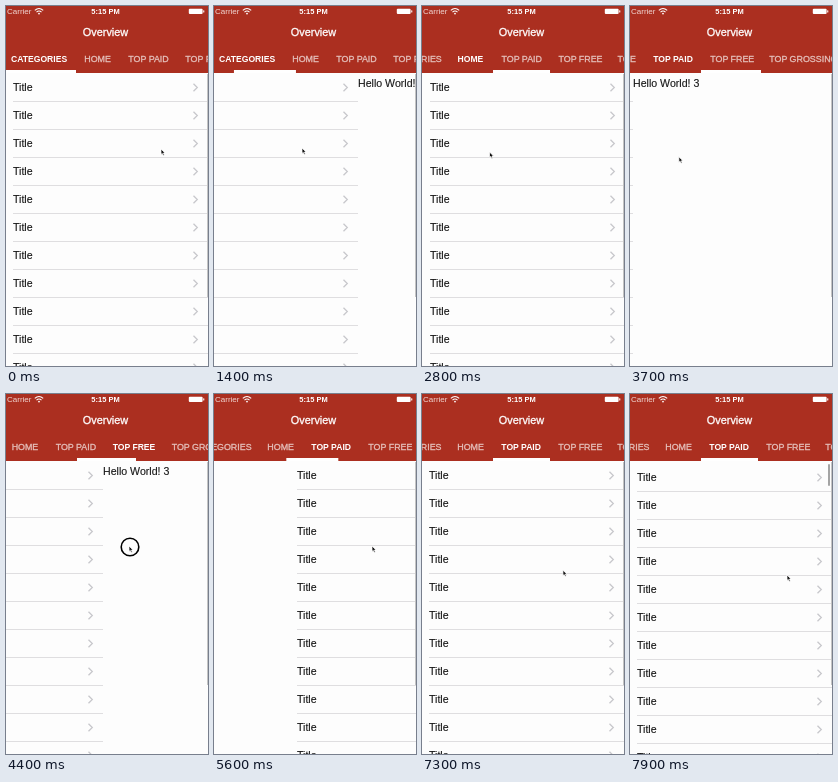
Recreate the animation shown at these times as an HTML page. Size 202 by 360 pixels, loop 8 s.

```html
<!DOCTYPE html>
<html lang="en">
<head>
<meta charset="utf-8">
<title>Overview</title>
<style>
  html, body { margin: 0; width: 100%; height: 100%; overflow: hidden; }
  body { font: 10.6px "Liberation Sans", Arial, sans-serif; color: #161616; background: #fdfdfd; }
  #stage { position: relative; width: 202px; height: 360px; overflow: hidden; background: #fdfdfd; }
  #stage div, #stage svg, #stage span { position: absolute; }
  .page { top: 0; width: 202px; height: 360px; -webkit-text-stroke: .12px; }
  .row { left: 7px; width: 195px; height: 27px; line-height: 27px; border-bottom: 1px solid #dfdee0; }
  .row svg { left: 179px; top: 8px; }
  .hello { top: 71px; line-height: 13px; white-space: pre; }
  #head { width: 202px; height: 67px; background: #ab2f20; color: #fff; overflow: hidden; }
  #title { top: 19px; width: 199px; text-align: center; font-size: 10.9px; line-height: 14px; -webkit-text-stroke: .3px; }
  #carrier { left: 1px; top: 0; font-size: 8px; line-height: 11px; color: #f1d8d4; }
  #clock { width: 199px; top: 0; text-align: center; font-size: 7.5px; line-height: 11px; font-weight: bold; }
  .tab { top: 47px; font-size: 8.9px; line-height: 13px; white-space: pre; color: #e5c1bc; -webkit-text-stroke: .3px; }
  .tab.on { color: #fff; font-weight: bold; font-size: 8.6px; -webkit-text-stroke: 0; }
  #bar { left: 0; top: 64px; height: 3px; background: #fff; }
  #edge { left: 201px; top: 68px; width: 1px; height: 223px; background: #c4c4c4; }
  #thumb { left: 198px; top: 70px; width: 2px; height: 22px; border-radius: 1px; background: #a4a4a4; }
  #cursor, #ring { left: 0; top: 0; overflow: visible; }
</style>
</head>
<body>
<div id="stage">
  <div id="strip"></div>
  <div id="thumb"></div>
  <div id="edge"></div>
  <div id="head">
    <div id="carrier">Carrier</div>
    <svg width="10" height="8" style="left:28px;top:1px" fill="none" stroke="#fff" stroke-width="1.1">
      <path d="M.8 3.4Q5 -.4 9.2 3.4M2.5 5.1Q5 2.9 7.5 5.1"/>
      <circle cx="5" cy="6.6" r=".9" fill="#fff" stroke="none"/>
    </svg>
    <div id="clock">5:15 PM</div>
    <svg width="18" height="8" style="left:182px;top:2px" fill="#fff">
      <rect x=".8" y=".8" width="13.8" height="5.2" rx="1"/>
      <rect x="15.2" y="2.3" width="1.1" height="2.2" rx=".5"/>
    </svg>
    <div id="title">Overview</div>
    <div id="tabs"></div>
    <div id="bar"></div>
  </div>
  <svg id="ring" width="20" height="20"><circle cx="1" cy="1" r="8.8" fill="none" stroke="#000" stroke-width="1.6"/></svg>
  <svg id="cursor" width="8" height="10"><path transform="scale(.85)" d="M0 0V6.4L1.5 5.2 2.6 7.6 3.9 7 2.9 4.7H4.8Z" fill="#111" stroke="#fff" stroke-width=".9"/></svg>
</div>
<script>
const LOOP = 8000, STEP = 100, W = 202;
const $ = id => document.getElementById(id);

const names = ["CATEGORIES", "HOME", "TOP PAID", "TOP FREE", "TOP GROSSING"];
const textX = [5, 78.3, 122.3, 179.3, 238.3];
const edges = [0, 69.5, 114, 171, 231];

const linear = u => u;
const out = u => 1 - (1 - u) ** 3;
const smooth = u => u * u * (3 - 2 * u);
const drag = u => u ** 1.3;

// [time, page position, easing into it]
const swipes = [
  [0, 0], [1150, 0], [1400, .287, drag], [1500, .42, linear], [1950, 1, out],
  [2150, 1], [2350, 1.35, drag], [2900, 2, out],
  [3100, 2], [3350, 2.4, drag], [3850, 3, out],
  [4150, 3], [4400, 2.52, drag], [4900, 2, out],
  [5350, 2], [5600, 1.624, drag], [6000, 1, out],
  [6150, 1], [6350, 1.38, drag], [6650, 2, out]
];

// [time, x, y] of the pointer tip
const pointer = [
  [0, 155, 143], [600, 156, 145], [1150, 155, 143], [1400, 88, 142], [1500, 66, 143],
  [1800, 80, 145], [2150, 141, 146], [2350, 72, 146], [2800, 67.5, 146],
  [3100, 136, 148], [3350, 52, 150], [3850, 48, 151], [4150, 50, 152],
  [4400, 123, 152], [4800, 115, 152], [5350, 76, 153], [5600, 158, 152],
  [5800, 170, 160], [6150, 172, 184], [6350, 96, 188], [6700, 95, 188],
  [7600, 157, 172], [7900, 157, 181]
];

const releases = [1500, 2300, 3300, 4400, 5700, 6300];
const pull = [[0, 0], [7700, 0], [7900, 2, linear]];

function sample(keys, t, col, ease) {
  const i = keys.findIndex(k => k[0] > t);
  if (i < 0) return keys[keys.length - 1][col];
  const a = keys[i - 1], b = keys[i];
  const f = ease || b[2] || linear;
  return a[col] + (b[col] - a[col]) * f((t - a[0]) / (b[0] - a[0]));
}

// The highlighted tab is the last page that came to rest.
function restedPage(t) {
  return swipes.filter(k => k[0] <= t && Number.isInteger(k[1])).pop()[1];
}

function tabScroll(p) {
  return p < 2 ? Math.max(0, 48 * (p - 1) - 5) : 43 + 57 * (p - 2);
}

function edgeAt(p, shift) {
  const i = Math.min(Math.floor(p), 2) + shift;
  const u = p - i + shift;
  return edges[i] + ((edges[i + 1] ?? 306) - edges[i]) * u;
}

const chevron = '<svg width="8" height="12" fill="none" stroke="#c8c8cc" stroke-width="1.3"><path d="M1.5 1.7L5.3 5.5 1.5 9.3"/></svg>';
const table = '<div class="list">' + Array.from({ length: 11 }, (_, i) =>
  `<div class="row" style="top:${68 + 28 * i}px">Title${chevron}</div>`).join("") + "</div>";

$("strip").innerHTML = [0, 1, 2, 3].map(i =>
  `<div class="page" style="left:${i * W}px">${i % 2 ? `<div class="hello">Hello World! ${i}</div>` : table}</div>`).join("");
$("tabs").innerHTML = names.map((n, i) => `<span class="tab" style="left:${textX[i]}px">${n}</span>`).join("");

const tabs = [...document.querySelectorAll(".tab")];
const list = document.querySelectorAll(".list")[1];
const move = (el, x, y = 0) => el.style.transform = `translate(${x}px,${y}px)`;

function draw(t) {
  const p = sample(swipes, t, 1);
  const scroll = tabScroll(p);
  const left = edgeAt(p, 0), right = edgeAt(p, 1);
  const down = sample(pull, t, 1);
  const x = sample(pointer, t, 1, smooth), y = sample(pointer, t, 2, smooth);
  const rest = restedPage(t);

  move($("strip"), Math.round(-p * W));
  move($("tabs"), -scroll);
  move($("bar"), left - scroll);
  $("bar").style.width = right - left + "px";
  tabs.forEach((tab, i) => tab.classList.toggle("on", i === rest));
  move(list, 0, down);
  $("thumb").style.visibility = down > 0 ? "visible" : "hidden";
  move($("cursor"), x, y);
  move($("ring"), x, y);
  $("ring").style.visibility = releases.some(r => t >= r && t < r + STEP) ? "visible" : "hidden";
}

const start = performance.now();
function tick() {
  const t = (performance.now() - start) % LOOP;
  draw(Math.floor(t / STEP) * STEP);
  requestAnimationFrame(tick);
}
tick();
</script>
</body>
</html>
```
